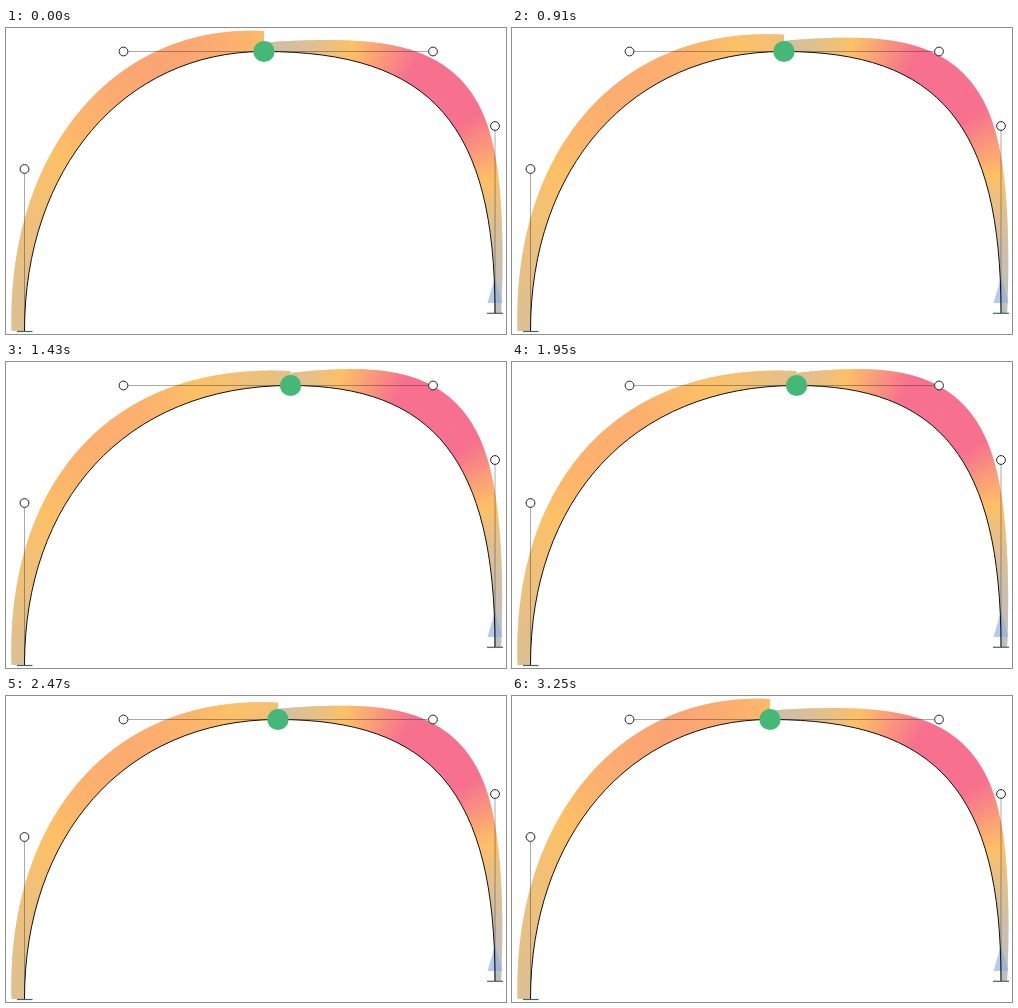
Recreate the animation shown at these times as an HTML page with a canvas. Size 500 px wide and 306 px high, loop 3750 ms.

```html
<!DOCTYPE html>
<html lang="en">
<head>
<meta charset="utf-8">
<title>Curvature comb</title>
<style>
html, body { margin: 0; width: 100%; height: 100%; overflow: hidden; background: #fff; }
canvas { display: block; width: 500px; height: 306px; }
</style>
</head>
<body>
<canvas id="stage"></canvas>
<script>
const W = 500, H = 306, LOOP = 3750, STEP = 130, LAST = 11;
const COMB = 5140;
const STOPS = [
  [0.00125, [190, 191, 192]],
  [0.0038, [253, 192, 102]],
  [0.0062, [247, 113, 143]]
];
const START = [18.5, 303], END = [489, 285];
const HANDLES = [[18.5, 141], [117.5, 23.5], [427, 23.5], [489, 98]];

const canvas = document.getElementById('stage');
const ctx = canvas.getContext('2d');
const dpr = window.devicePixelRatio || 1;
canvas.width = W * dpr;
canvas.height = H * dpr;
ctx.scale(dpr, dpr);

const clamp = (v, lo, hi) => Math.max(lo, Math.min(hi, v));

// The node is dragged right in discrete steps, then back along the same steps.
function stepAt(ms) {
  const up = Math.floor((ms - 130) / STEP);
  const down = 10 - Math.floor((ms - 1950) / STEP);
  return clamp(Math.min(up, down), 0, LAST);
}

function nodeX(step) {
  const u = step / 12, p = 1.84;
  const a = u ** p, b = (1 - u) ** p;
  return 258 + 28 * a / (a + b);
}

function colorFor(k) {
  const [lo, hi] = k < STOPS[1][0] ? [STOPS[0], STOPS[1]] : [STOPS[1], STOPS[2]];
  const f = clamp((k - lo[0]) / (hi[0] - lo[0]), 0, 1);
  return `rgb(${lo[1].map((c, i) => Math.round(c + (hi[1][i] - c) * f))})`;
}

// Point, curvature and comb tip of a cubic at t.
function sample(c, t) {
  const s = 1 - t;
  const axis = i => {
    const [a, b, d, e] = c.map(p => p[i]);
    return [
      s * s * s * a + 3 * s * s * t * b + 3 * s * t * t * d + t * t * t * e,
      3 * (s * s * (b - a) + 2 * s * t * (d - b) + t * t * (e - d)),
      6 * (s * (d - 2 * b + a) + t * (e - 2 * d + b))
    ];
  };
  const [x, dx, ddx] = axis(0), [y, dy, ddy] = axis(1);
  const len = Math.hypot(dx, dy);
  const k = (dx * ddy - dy * ddx) / len ** 3;
  const h = COMB * k / len;
  return { k, base: [x, y], tip: [x + dy * h, y - dx * h] };
}

function drawComb(c) {
  const n = 240;
  for (let i = 0; i < n; i++) {
    const a = sample(c, i / n);
    const b = sample(c, Math.min(1, (i + 1.6) / n));
    ctx.fillStyle = colorFor(a.k);
    ctx.beginPath();
    [a.base, a.tip, b.tip, b.base].forEach(p => ctx.lineTo(...p));
    ctx.fill();
  }
}

function line(a, b, color, width) {
  ctx.strokeStyle = color;
  ctx.lineWidth = width;
  ctx.beginPath();
  ctx.moveTo(...a);
  ctx.lineTo(...b);
  ctx.stroke();
}

function disc([x, y], r, fill, stroke) {
  ctx.beginPath();
  ctx.arc(x, y, r, 0, Math.PI * 2);
  ctx.fillStyle = fill;
  ctx.fill();
  if (stroke) {
    ctx.strokeStyle = stroke;
    ctx.lineWidth = 1;
    ctx.stroke();
  }
}

function draw(x) {
  const node = [x, 23.5];
  const left = [START, HANDLES[0], HANDLES[1], node];
  const right = [node, HANDLES[2], HANDLES[3], END];

  ctx.fillStyle = '#fff';
  ctx.fillRect(0, 0, W, H);
  drawComb(left);
  drawComb(right);

  ctx.fillStyle = 'rgba(140,175,222,.65)';
  ctx.beginPath();
  [[489, 249.5], [496.5, 275], [481.5, 275]].forEach(p => ctx.lineTo(...p));
  ctx.fill();

  const guide = 'rgba(40,40,40,.5)';
  line(START, HANDLES[0], guide, 0.8);
  line(HANDLES[1], HANDLES[2], guide, 0.8);
  line(HANDLES[3], END, guide, 0.8);
  line([11, 303.5], [26.5, 303.5], '#3f6471', 1.2);
  line([481, 285.3], [497, 285.3], '#3f6471', 1.2);

  ctx.strokeStyle = '#111';
  ctx.lineWidth = 1;
  ctx.beginPath();
  ctx.moveTo(...START);
  for (const c of [left, right]) ctx.bezierCurveTo(...c[1], ...c[2], ...c[3]);
  ctx.stroke();

  HANDLES.forEach(p => disc(p, 4.4, '#fff', '#222'));
  disc(node, 10.6, '#45b878');
}

const begin = performance.now();
function tick() {
  draw(nodeX(stepAt((performance.now() - begin) % LOOP)));
  requestAnimationFrame(tick);
}
tick();
</script>
</body>
</html>
```
